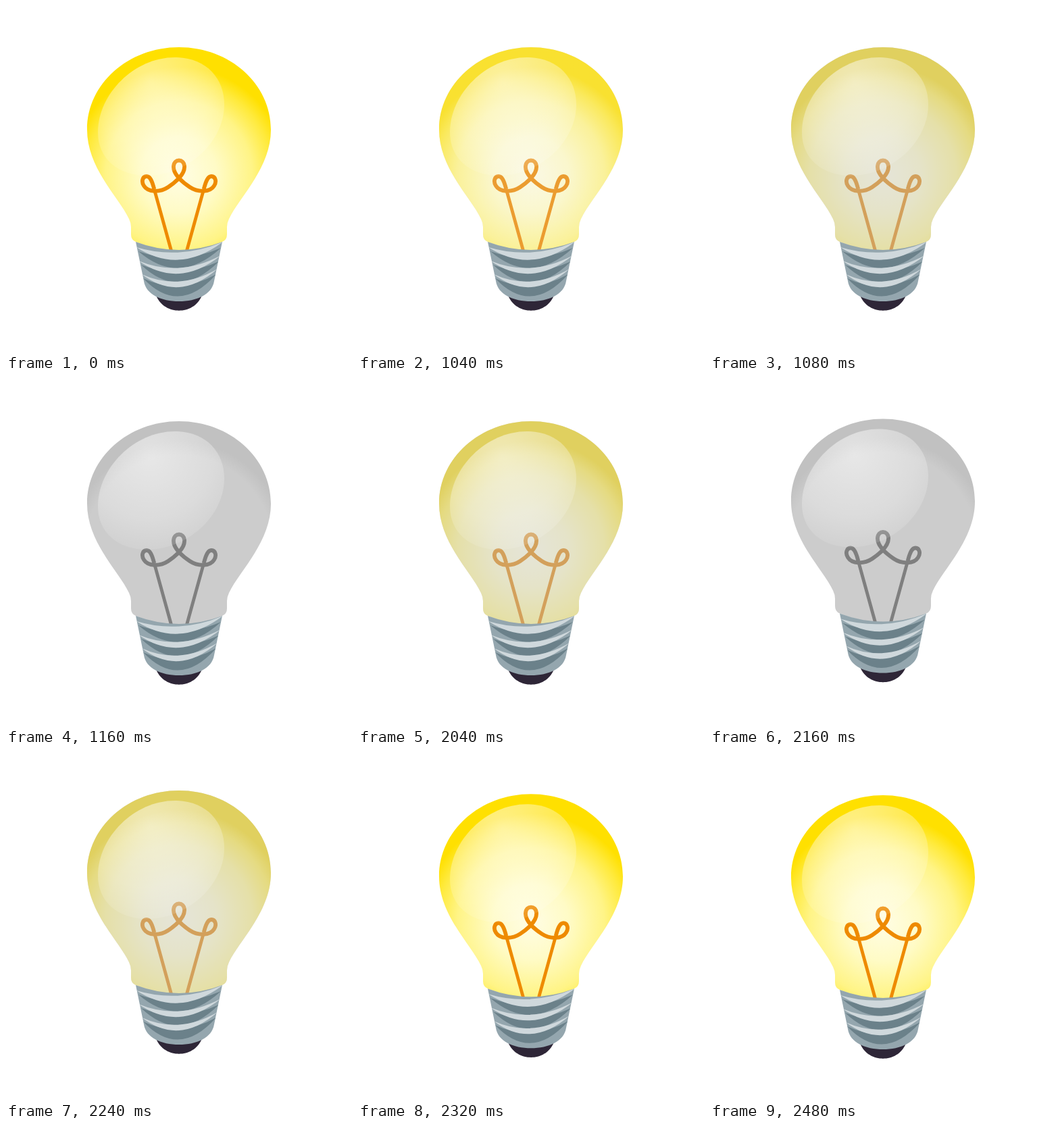
Animation of 512x512 px, one loop 2.88 s. Source, as an HTML page:

```html
<!DOCTYPE html>
<html lang="en">
<head>
<meta charset="utf-8">
<title>Light bulb</title>
<style>
  @property --lit { syntax: "<number>"; inherits: true; initial-value: 1; }
  @property --y { syntax: "<length>"; inherits: true; initial-value: 0px; }

  html, body { margin: 0; width: 100%; height: 100%; overflow: hidden; background: #fff; }
  svg { display: block; width: 100vw; height: 100vh; }

  /* 25 pictures per second, so every 40 ms step is 1.389 % */
  .bulb { animation: flicker 2880ms step-end infinite; transform: translateY(var(--y)); }
  .glow { opacity: var(--lit); }
  .off { opacity: calc(2 - 2 * var(--lit)); }
  .cold { opacity: calc((1 - var(--lit)) * (1 - var(--lit))); stroke: #7f7f7f; }
  .hot { stroke: #ee8a00; }
  .wire { fill: none; stroke-width: 5.8; stroke-linejoin: round; }
  .leg { stroke-width: 4.8; }
  .dark { fill: #6b818a; }
  .light { fill: #cfd8dc; }

  @keyframes flicker {
    0% { --lit: 1; --y: 0px; }
    36.11% { --lit: .79; --y: 0px; }
    37.5% { --lit: .5; --y: 0px; }
    38.88% { --lit: .2; --y: 0px; }
    40.27% { --lit: 0; --y: 0px; }
    70.83% { --lit: .5; --y: 0px; }
    72.22% { --lit: 1; --y: 0px; }
    73.61% { --lit: .5; --y: -1.2px; }
    75% { --lit: 0; --y: -3.5px; }
    76.38% { --lit: 0; --y: -5.8px; }
    77.77% { --lit: .5; --y: -7px; }
    79.16% { --lit: 1; --y: -5.4px; }
    80.55% { --lit: 1; --y: -1.8px; }
    81.94% { --lit: 1; --y: 1.8px; }
    83.33% { --lit: 1; --y: 3.4px; }
    84.72% { --lit: 1; --y: 1.7px; }
    86.11%, 100% { --lit: 1; --y: 0px; }
  }
</style>
</head>
<body>
<svg viewBox="0 0 512 512">
  <defs>
    <radialGradient id="warm" gradientUnits="userSpaceOnUse" cx="256" cy="250" r="160">
      <stop offset="0" stop-color="#fffde4"/>
      <stop offset=".35" stop-color="#fffbc6"/>
      <stop offset=".68" stop-color="#fff486"/>
      <stop offset=".87" stop-color="#ffea3c"/>
      <stop offset="1" stop-color="#ffe000"/>
    </radialGradient>
    <radialGradient id="grey" gradientUnits="userSpaceOnUse" cx="256" cy="250" r="160">
      <stop offset=".87" stop-color="#ccc"/>
      <stop offset="1" stop-color="#c1c1c1"/>
    </radialGradient>
    <radialGradient id="shine" gradientUnits="userSpaceOnUse" cx="213" cy="112" r="145">
      <stop offset="0" stop-color="#fff" stop-opacity=".54"/>
      <stop offset=".65" stop-color="#fff" stop-opacity=".3"/>
      <stop offset="1" stop-color="#fff" stop-opacity=".08"/>
    </radialGradient>
    <path id="glass" d="M256 61C181 61 120 115 120 183C120 240 167 283 182 315Q185 321 185 327V338Q185 346 192 349Q256 375 320 349Q327 346 327 338V327Q327 321 330 315C345 283 392 240 392 183C392 115 331 61 256 61Z"/>
    <g id="half">
      <path class="leg" d="M244.5 362L219.3 271"/>
      <path d="M219.3 271C216 258 213 252 208 252C202 252 200 260 204 266C210 276 228 276 240 268C252 260 265 248 264 237C263.5 231 260 228.5 256 228.5"/>
    </g>
    <g id="wire">
      <use href="#half"/>
      <use href="#half" transform="translate(512) scale(-1 1)"/>
    </g>
    <path id="socket" d="M192 349Q256 373 320 349L308 407C305 427 282 437 256 437C230 437 207 427 204 407Z"/>
    <clipPath id="inSocket"><use href="#socket"/></clipPath>
  </defs>

  <g class="bulb">
    <path fill="#2e2637" d="M222 428C228 444 243 450.7 256 450.7C269 450.7 284 444 290 428Z"/>
    <use href="#glass" class="off" fill="url(#grey)"/>
    <use href="#wire" class="wire cold"/>
    <g class="glow">
      <use href="#glass" fill="url(#warm)"/>
      <use href="#wire" class="wire hot"/>
    </g>
    <path fill="url(#shine)" d="M250 76C295 76 323 106 323 146C323 200 270 251 208 251C165 251 136 225 136 187C136 130 190 76 250 76Z"/>
    <use href="#socket" fill="#94a6ae"/>
    <g clip-path="url(#inSocket)">
      <path class="dark" d="M196 363Q256 415 318 358Q256 385 196 363Z"/>
      <path class="light" d="M193 357Q256 398 321 349Q256 376 193 357Z"/>
      <path class="dark" d="M200 383Q256 437 315 378Q256 405 200 383Z"/>
      <path class="light" d="M196 377Q256 419 318 369Q256 402 196 377Z"/>
      <path class="dark" d="M203 403Q256 459 311 397Q256 428 203 403Z"/>
      <path class="light" d="M201 397Q256 439 313 389Q256 422 201 397Z"/>
    </g>
  </g>
</svg>
</body>
</html>
```
